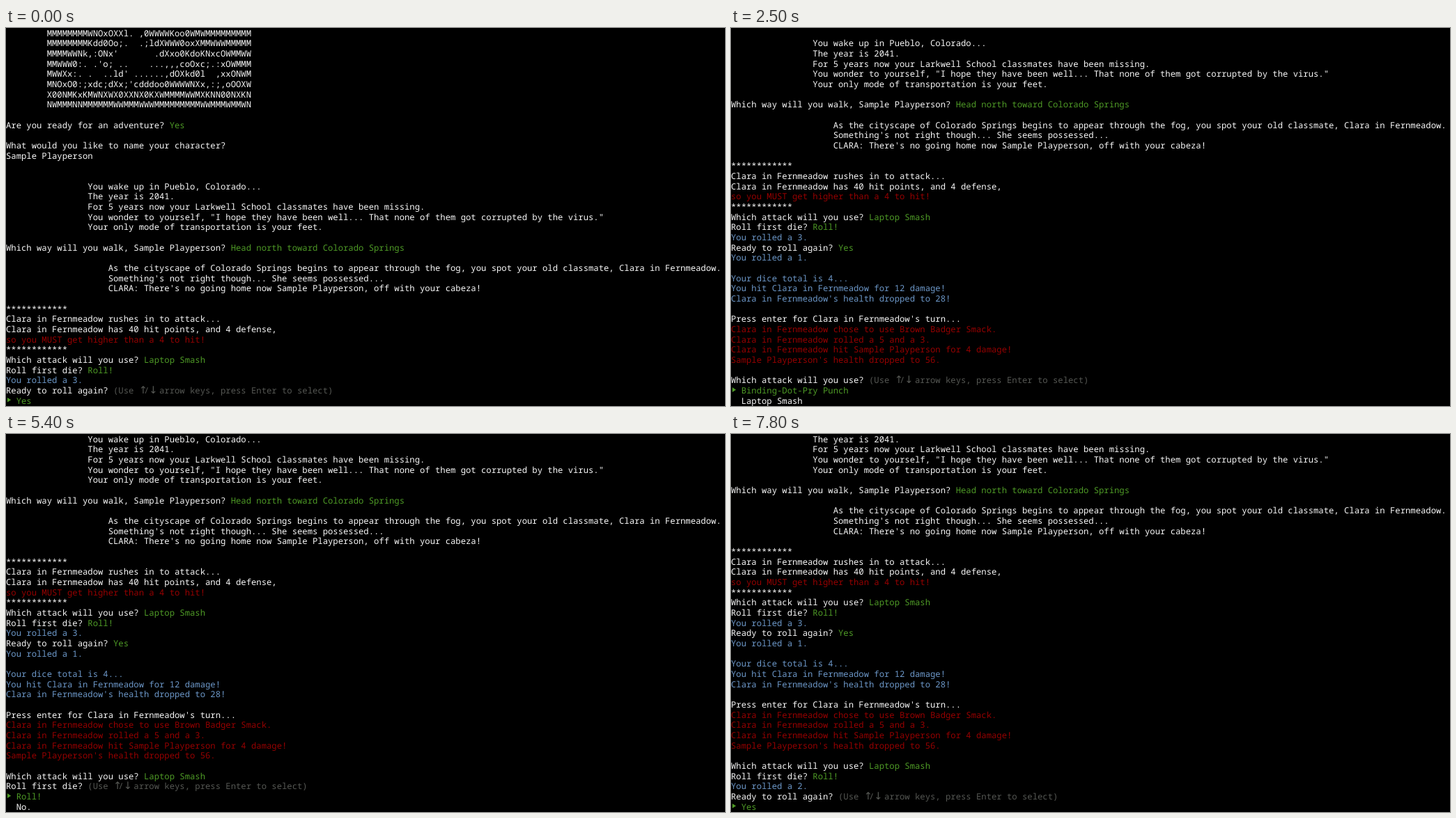
An HTML page with a canvas that plays this animation: 1032x543 px, repeating every 8000 ms.

```html
<!DOCTYPE html>
<html lang="en">
<head>
<meta charset="utf-8">
<title>Terminal adventure</title>
<style>
html, body { margin: 0; width: 100%; height: 100%; overflow: hidden; background: #000; }
canvas { display: block; }
</style>
</head>
<body>
<canvas id="term" width="1032" height="543"></canvas>
<script>
const ctx = document.getElementById('term').getContext('2d');
const W = 1032, H = 543, LOOP = 8000;
const CELL = 22 / 3, ROW = 44 / 3, ROWS = 37, BASE = 11.8;
const FONT = '12.22px "Noto Sans Mono", "DejaVu Sans Mono", monospace';
const ARROW_FONT = '14.67px "DejaVu Sans", sans-serif';
const COLORS = { w: '#f8f8f8', g: '#4e9a26', r: '#960000', b: '#6c97c8', d: '#555753' };

const HERO = 'Sample Playperson';
const FOE = 'Clara in Fernmeadow';
const HINT = '{d}(Use ↑/↓ arrow keys, press Enter to select)';
const indent = (n, lines) => lines.map(s => ' '.repeat(n) + s);
const paint = (c, lines) => lines.map(s => `{${c}}${s}`);

// Lines hold {x} markers that switch the colour.
const intro = [
  ...indent(8, [
    "MMMMMMMMWNOxOXXl. ,0WWWWKoo0WMWMMMMMMMMM",
    "MMMMMMMMKdd0Oo;.  .;ldXWWW0oxXMMWWWMMMMM",
    "MMMMWWNk,:ONx'       .dXxo0KdoKNxcOWMMWW",
    "MMWWW0:. .'o; ..    ...,,,coOxc;.:xOWMMM",
    "MWWXx:. .  ..ld' ......,dOXkd0l  ,xxONWM",
    "MNOxO0:;xdc;dXx;'cdddoo0WWWWNXx,:;,oOOXW",
    "X00NMKxKMWNXWX0XXNX0KXWMMMMWWMXKNN00NXKN",
    "NWMMMNNMMMMMMWWMMMWWWMMMMMMMMMWWMMMWMMWN"
  ]),
  '',
  'Are you ready for an adventure? {g}Yes',
  '',
  'What would you like to name your character?',
  HERO,
  '', '',
  ...indent(16, [
    'You wake up in Pueblo, Colorado...',
    'The year is 2041.',
    'For 5 years now your Larkwell School classmates have been missing.',
    'You wonder to yourself, "I hope they have been well... That none of them got corrupted by the virus."',
    'Your only mode of transportation is your feet.'
  ]),
  '',
  `Which way will you walk, ${HERO}? {g}Head north toward Colorado Springs`,
  '',
  ...indent(20, [
    `As the cityscape of Colorado Springs begins to appear through the fog, you spot your old classmate, ${FOE}.`,
    "Something's not right though... She seems possessed...",
    `CLARA: There's no going home now ${HERO}, off with your cabeza!`
  ]),
  '',
  '************',
  `${FOE} rushes in to attack...`,
  `${FOE} has 40 hit points, and 4 defense,`,
  '{r}so you MUST get higher than a 4 to hit!',
  '************',
  'Which attack will you use? {g}Laptop Smash',
  'Roll first die? {g}Roll!',
  '{b}You rolled a 3.'
];

const myTurn = [
  ...intro,
  'Ready to roll again? {g}Yes',
  ...paint('b', [
    'You rolled a 1.',
    '',
    'Your dice total is 4...',
    `You hit ${FOE} for 12 damage!`,
    `${FOE}'s health dropped to 28!`
  ]),
  '',
  `Press enter for ${FOE}'s turn...`
];

const foeTurn = [
  ...myTurn,
  ...paint('r', [
    `${FOE} chose to use Brown Badger Smack.`,
    `${FOE} rolled a 5 and a 3.`,
    `${FOE} hit ${HERO} for 4 damage!`,
    `${HERO}'s health dropped to 56.`
  ]),
  ''
];

const chosen = [...foeTurn, 'Which attack will you use? {g}Laptop Smash'];
const rolled = [...chosen, 'Roll first die? {g}Roll!', '{b}You rolled a 2.'];

const menu = (log, ask, options, pick, hint) => [
  ...log,
  ask + ' ' + (hint ? HINT : ''),
  ...options.map((s, i) => i === pick ? '{g}‣ ' + s : '  ' + s)
];
const attack = (pick, hint) =>
  menu(foeTurn, 'Which attack will you use?', ['Binding-Dot-Pry Punch', 'Laptop Smash'], pick, hint);
const roll = (pick, hint) =>
  menu(chosen, 'Roll first die?', ['Roll!', 'No.'], pick, hint);
const again = log => menu(log, 'Ready to roll again?', ['Yes'], 0, true);

// [start time, screen, cursor shown]
const timeline = [
  [0, again(intro)],
  [500, myTurn, true],
  [700, myTurn],
  [1300, myTurn, true],
  [1900, myTurn],
  [2200, myTurn, true],
  [2500, attack(0, true)],
  [3600, attack(1)],
  [4500, attack(0)],
  [4600, attack(1)],
  [5400, roll(0, true)],
  [6800, roll(1)],
  [7200, roll(0)],
  [7800, again(rolled)]
];

function pointer(x, y) {
  ctx.beginPath();
  ctx.moveTo(x + 2, y + 3);
  ctx.lineTo(x + 7.2, y + 6.3);
  ctx.lineTo(x + 2, y + 9.6);
  ctx.fill();
}

function setFont(font, grid) {
  ctx.letterSpacing = '0px';
  ctx.font = font;
  if (grid) ctx.letterSpacing = (CELL - ctx.measureText('M').width) + 'px';
}

function drawLine(line, row) {
  const y = row * ROW;
  let col = 0;
  ctx.fillStyle = COLORS.w;
  line.split(/\{(\w)\}/).forEach((part, i) => {
    if (i % 2) {
      ctx.fillStyle = COLORS[part];
      return;
    }
    for (const run of part.split(/([‣↑↓])/)) {
      const x = col * CELL;
      if (run === '‣') {
        pointer(x, y);
      } else if (run === '↑' || run === '↓') {
        setFont(ARROW_FONT);
        ctx.fillText(run, x, y + BASE);
      } else if (run) {
        setFont(FONT, true);
        ctx.fillText(run, x, y + BASE);
      }
      col += run.length;
    }
  });
}

function draw(log, cursor) {
  ctx.fillStyle = '#000';
  ctx.fillRect(0, 0, W, H);
  ctx.textRendering = 'geometricPrecision';
  log.slice(-ROWS).forEach(drawLine);
  if (cursor) {
    ctx.fillStyle = '#fff';
    ctx.fillRect(45 * CELL, 36 * ROW - 0.5, CELL, ROW);
  }
}

let shown = null;
function tick(now) {
  const t = now % LOOP;
  const step = timeline.filter(s => s[0] <= t).pop();
  if (step !== shown) {
    shown = step;
    draw(step[1], step[2]);
  }
  requestAnimationFrame(() => tick(performance.now() - start));
}
const start = performance.now();
tick(0);
</script>
</body>
</html>
```
